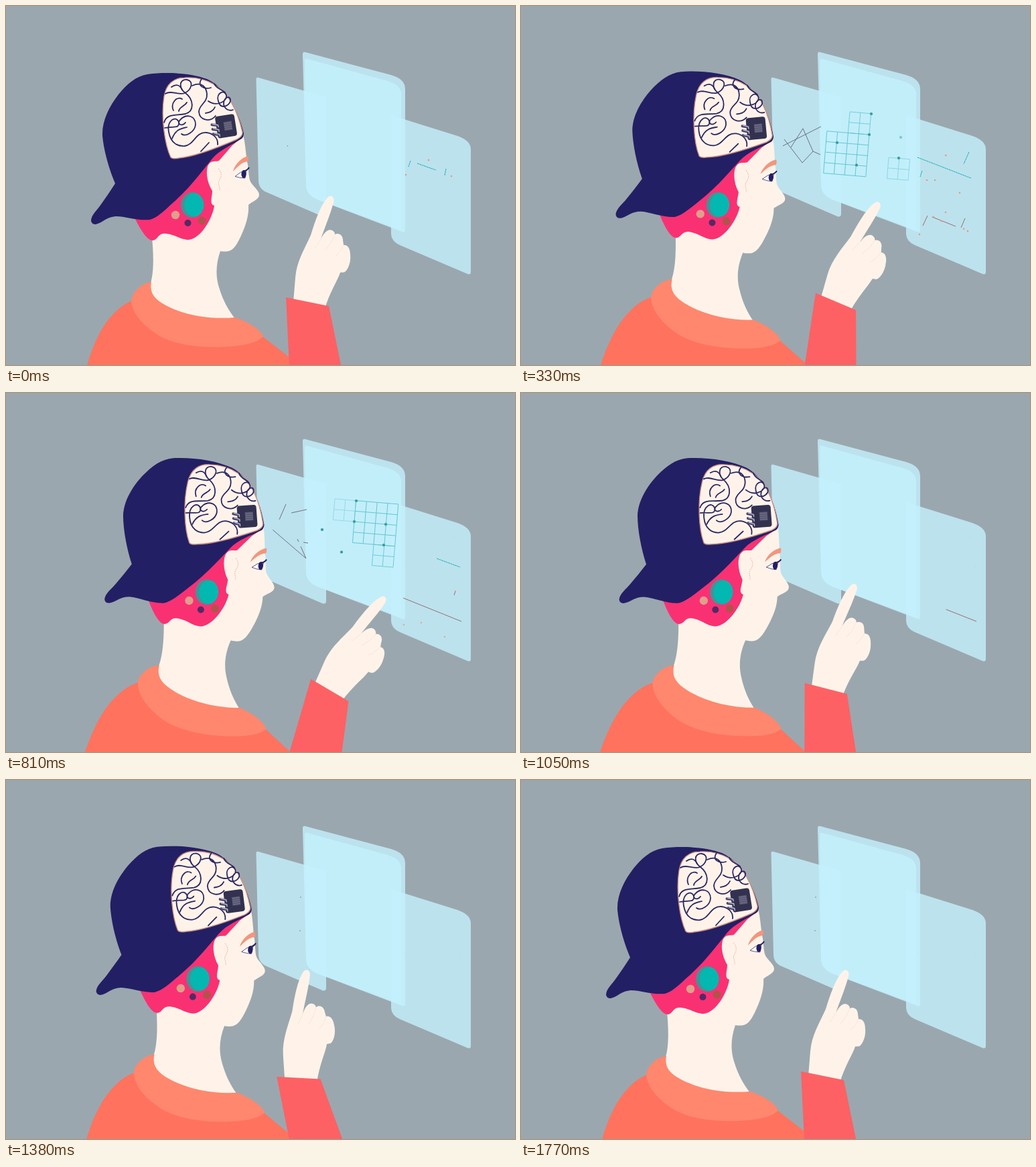
These frames come from a looping animation (760x536 px, 1800 ms). An HTML page without scripts:

```html
<!DOCTYPE html>
<html lang="en">
<head>
<meta charset="utf-8">
<title>Touch panels</title>
<style>
html, body { margin: 0; width: 100%; height: 100%; overflow: hidden; background: #9ba7ae; }
svg { display: block; width: 760px; height: 536px; }
.skin { fill: #fff3e9; }
.navy { fill: #231f64; }
.line { fill: none; stroke: #6a7280; stroke-width: 1; }
.teal { stroke: #18b0ad; stroke-dasharray: 3 .6; }
.rust { stroke: #94706f; }
.dots { fill: none; stroke: #ee9480; stroke-width: 2.6; stroke-linecap: round; }
.grid { fill: none; stroke: #62c8cf; stroke-width: 1; }
#g2, #g4 { vector-effect: non-scaling-stroke; }
.nodes circle { fill: #4b908f; stroke: #2ba9a5; stroke-width: .8; }
.curl { fill: none; stroke: #2a2662; stroke-width: 1.8; stroke-linecap: round; }
</style>
</head>
<body>
<svg viewBox="0 0 760 536">
<defs>
  <path id="g2" d="M0 0h2M0 1h2M0 2h2M0 0v2M1 0v2M2 0v2"/>
  <path id="g4" d="M0 0h4M0 1h4M0 2h4M0 3h4M0 4h4M0 0v4M1 0v4M2 0v4M3 0v4M4 0v4"/>
</defs>
<rect width="760" height="536" fill="#9ba7ae"/>

<!-- translucent panels -->
<g fill="#c5f2fe" fill-opacity=".8">
  <path d="M373.500 109Q373.500 106 377 107L478 136V311Q477.500 316 472 314L389 278Q377 273 377 260Z"/>
  <path d="M575 163L674 194Q694 201 694 214V397Q694 402 689 400L588 357Q575 351 575 340Z"/>
  <path d="M443 72Q443 68 447 69L575 103Q596 109 596 124V334Q596 339 591 337L465 289Q449 282 448 268Z"/>
  <path d="M446 82Q446 78 450 79L570 112Q590 118 590 132V335L465 289Q449 282 448 268Z"/>
</g>

<!-- left panel: web of lines -->
<g class="line">
  <path><animate attributeName="d" dur="1.8s" repeatCount="indefinite" keyTimes="0;.183;.317;.45;.53;1" values="M420 209L421 209;M391 209L448 180;M385 193L449 175;M426 179L449 174;M449 174L449 174;M449 174L449 174"/></path>
  <path><animate attributeName="d" dur="1.8s" repeatCount="indefinite" keyTimes="0;.183;.317;.45;.53;1" values="M420 209L420 209;M393 199L420 234;M385 193L431 245;M398 204L448 247;M448 247L448 247;M448 247L448 247"/></path>
  <path><animate attributeName="d" dur="1.8s" repeatCount="indefinite" keyTimes="0;.183;.317;.45;.53;1" values="M420 209L420 209;M421 183L403 211;M418 173L399 212;M418 166L408 189;M418 166L418 166;M418 166L418 166"/></path>
  <path><animate attributeName="d" dur="1.8s" repeatCount="indefinite" keyTimes="0;.183;.317;.45;.53;1" values="M420 209L420 209;M421 183L436 217;M418 173L436 217;M435 218L437 222;M437 222L437 222;M437 222L437 222"/></path>
  <path><animate attributeName="d" dur="1.8s" repeatCount="indefinite" keyTimes="0;.183;.317;.45;.53;1" values="M420 209L420 209;M436 217L420 234;M436 217L430 245;M440 229L448 247;M448 247L448 247;M448 247L448 247"/></path>
  <path><animate attributeName="d" dur="1.8s" repeatCount="indefinite" keyTimes="0;.183;.317;.45;.53;1" values="M420 209L420 209;M436 217L447 222;M436 217L447 221;M444 223L451 224;M451 224L451 224;M451 224L451 224"/></path>
</g>
<g fill="#5c6b78" opacity="0">
  <circle cx="440" cy="175" r=".7"/><circle cx="439" cy="225" r=".7"/>
  <animate attributeName="opacity" dur="1.8s" repeatCount="indefinite" calcMode="discrete" keyTimes="0;.62;1" values="0;1;1"/>
</g>

<!-- centre panel: grid blocks -->
<g class="grid" transform="matrix(15.8 1.33 -1.3 15.7 491 158)">
  <use href="#g4" x="-2" y="2" opacity="0"><animate attributeName="opacity" dur="1.8s" repeatCount="indefinite" keyTimes="0;.05;.15;.34;.42;1" values="0;0;1;1;0;0"/></use>
  <use href="#g2" opacity="0"><animate attributeName="opacity" dur="1.8s" repeatCount="indefinite" keyTimes="0;.1;.2;.41;.49;1" values="0;0;1;1;0;0"/></use>
  <use href="#g2" x="4" y="4" opacity="0"><animate attributeName="opacity" dur="1.8s" repeatCount="indefinite" keyTimes="0;.13;.22;.44;.53;1" values="0;0;1;1;0;0"/></use>
  <use href="#g4" x="2" opacity="0"><animate attributeName="opacity" dur="1.8s" repeatCount="indefinite" keyTimes="0;.19;.28;.47;.57;1" values="0;0;1;1;0;0"/></use>
</g>
<g class="nodes" opacity="0">
  <circle cx="523" cy="161" r="1.8"/><circle cx="520" cy="192" r="1.8"/>
  <circle cx="472" cy="204" r="1.8"/><circle cx="501" cy="237.500" r="1.8"/>
  <circle cx="564" cy="227" r="1.8"/>
  <circle cx="567" cy="196" r="1.8"><animate attributeName="opacity" dur="1.8s" repeatCount="indefinite" keyTimes="0;.15;.25;1" values="0;.2;1;1"/></circle>
  <animate attributeName="opacity" dur="1.8s" repeatCount="indefinite" keyTimes="0;.07;.15;.48;.57;1" values="0;0;1;1;0;0"/>
</g>

<!-- right panel: plots -->
<g class="line">
  <path class="teal"><animate attributeName="d" dur="1.8s" repeatCount="indefinite" keyTimes="0;.183;.317;.45;.53;1" values="M614 235L642 245;M592 226L672 257;M592 226L678 260;M643 247L678 260;M678 260L678 260;M678 260L678 260"/></path>
  <path class="teal"><animate attributeName="d" dur="1.8s" repeatCount="indefinite" keyTimes="0;.183;.28;1" values="M604 231L601 240;M599 246L596 255;M594 258L594 258;M594 258L594 258"/></path>
  <path class="teal"><animate attributeName="d" dur="1.8s" repeatCount="indefinite" keyTimes="0;.183;.3;1" values="M657 243L655 253;M669 218L661 236;M669 215L669 215;M669 215L669 215"/></path>
  <path class="rust"><animate attributeName="d" dur="1.8s" repeatCount="indefinite" keyTimes="0;.1;.183;.317;.45;.7;.74;1" values="M630 321L630 321;M630 321L630 321;M614 315L649 329;M593 306L673 338;M593 306L680 341;M671 338L680 341;M680 341L680 341;M680 341L680 341"/></path>
  <path class="rust"><animate attributeName="d" dur="1.8s" repeatCount="indefinite" keyTimes="0;.1;.183;.317;.45;1" values="M609 306L609 306;M609 306L609 306;M607 313L600 328;M602 323L594 344;M594 346L594 346;M594 346L594 346"/></path>
  <path class="rust"><animate attributeName="d" dur="1.8s" repeatCount="indefinite" keyTimes="0;.1;.183;.317;.45;.5;1" values="M657 331L657 331;M657 331L657 331;M663 317L657 331;M671 301L662 322;M671 296L669 302;M671 294L671 294;M671 294L671 294"/></path>
</g>
<path class="dots">
  <animate attributeName="d" dur="1.8s" repeatCount="indefinite" keyTimes="0;.183;.317;1" values="M631 230h0M597 252h0M631 230h0M665 254h0;M634 223h0M606 260h0M618 260h0M655 279h0;M669 215h0M607 260h0M617 262h0M653 282h0;M669 215h0M607 260h0M617 262h0M653 282h0"/>
  <animate attributeName="opacity" dur="1.8s" repeatCount="indefinite" keyTimes="0;.33;.41;1" values="1;1;0;0"/>
</path>
<path class="dots" opacity="0">
  <animate attributeName="d" dur="1.8s" repeatCount="indefinite" keyTimes="0;.183;.317;.45;1" values="M634 316h0M616 308h0M628 312h0M661 325h0M667 326h0M595 334h0;M634 308h0M616 315h0M628 321h0M661 333h0M667 336h0M595 341h0;M635 304h0M616 340h0M637 346h0M671 302h0M658 359h0M592 349h0;M671 296h0M620 343h0M620 343h0M671 296h0M655 364h0M594 346h0;M671 296h0M620 343h0M620 343h0M671 296h0M655 364h0M594 346h0"/>
  <animate attributeName="opacity" dur="1.8s" repeatCount="indefinite" keyTimes="0;.09;.15;.43;.51;1" values="0;0;1;1;0;0"/>
</path>

<!-- figure -->
<g>
  <animateTransform attributeName="transform" type="rotate" dur="1.8s" repeatCount="indefinite" calcMode="spline" keyTimes="0;.283;.542;.933;1" keySplines=".35 0 .65 1;0 0 1 1;.35 0 .65 1;0 0 1 1" values="0 287 550;4.9 287 550;4.9 287 550;0 287 550;0 287 550"/>
  <path class="skin" d="M354 192C358 208 358 224 361 237C363 250 362 258 366 264C370 270 378 276 378 282C378 289 367 292 362 297C363 312 358 326 354 336C348 350 342 364 332 366Q326 367 320 366C313 386 313 404 318 420C324 440 332 454 342 467L300 480L230 460L212 425C221 405 221 380 218 345L230 230Z"/>
  <path fill="#f93173" d="M193 318C200 332 210 350 219 350C228 349 226 338 240 340C254 342 261 349 273 349C292 347 309 315 311 298C303 296 308 285 308 276C301 265 298 250 301 240C305 229 313 233 318 231L338 208L354 195L290 200Z"/>
  <path fill="none" stroke="#f2a595" stroke-dasharray="1.5 1.5" d="M317 243C323 249 322 255 318 261C316 267 320 269 319 275"/>
  <!-- ear studs -->
  <ellipse cx="278" cy="297" rx="17" ry="19" fill="#4b8f95"/>
  <ellipse cx="281" cy="297" rx="14.500" ry="17.500" fill="#02b8b0"/>
  <circle cx="253" cy="312" r="6.200" fill="#dfa08c"/>
  <circle cx="271.500" cy="324" r="5" fill="#532a66"/>
  <circle cx="292.500" cy="320.500" r="6" fill="#b3524c"/>
  <!-- eye -->
  <path fill="#f4957e" d="M339 247C341 238 350 227 361 224Q363 228 361 232C352 233 346 240 339 247Z"/>
  <path fill="#fff" stroke="#37305f" stroke-width=".8" d="M342 254.500Q350 247 359 245L357 257Q350 257 342 254.500Z"/>
  <ellipse cx="355" cy="251" rx="3.600" ry="6" class="navy"/>
  <path fill="none" stroke="#231f64" stroke-width="2" d="M354 247Q360 246 363 241"/>
  <!-- cap -->
  <path class="navy" d="M127 321C127 312 136 305 142 296C149 286 156 276 163 265C154 244 146 216 144 194C143 172 154 150 168 132C181 116 194 105 211 102C240 98 276 100 300 109C324 119 347 154 355 190Q355 195 352 198C338 207 318 215 307 229C288 253 270 276 249 294C237 305 226 316 215 319C196 321 179 314 164 314C150 315 146 322 137 325Q129 328 127 321Z"/>
  <path class="skin" stroke="#c98f86" stroke-width="1.4" d="M246 226C237 207 231 166 236 135C239 117 250 107 267 107C300 105 325 122 337 145C345 159 350 175 353 188Q354 194 345 199C315 212 280 225 258 227Q249 229 246 226Z"/>
  <g class="curl">
    <path d="M238 131C246 125 258 134 267 130C277 125 281 112 270 110C258 109 258 123 268 130C280 139 282 157 268 161C254 164 240 160 236 174"/>
    <path d="M247 121C255 115 260 119 263 125M250 156C245 145 255 134 263 139M258 157C259 150 267 150 270 144"/>
    <path d="M278 119C293 112 299 122 300 131C301 145 288 147 288 158C289 171 305 174 313 164M292 109C285 119 295 125 306 122M298 160C303 159 309 158 312 151"/>
    <path d="M302 142C315 151 331 142 329 133C326 124 313 130 317 142C320 155 333 150 335 142C336 132 324 136 325 147C327 155 334 157 339 155M311 116C314 124 322 124 327 129"/>
    <path d="M237 182C249 179 260 184 258 173C253 163 240 171 243 188C246 206 258 210 267 209C281 207 283 188 299 189C310 190 317 198 316 207"/>
    <path d="M262 191C268 196 282 188 283 177C283 163 269 161 261 169C253 176 263 181 268 174M248 198C253 184 262 183 270 181M291 217L303 204"/>
  </g>
  <!-- chip -->
  <g transform="rotate(-9 328 179)">
    <rect x="314" y="163" width="29" height="33" rx="4" fill="#323150"/>
    <rect x="325.500" y="173" width="12" height="13" fill="#565570"/>
    <path stroke="#858398" stroke-width=".7" d="M326 175h11m-11 3h11m-11 3h11m-11 3h11"/>
    <path fill="none" stroke="#48466c" stroke-width="4" stroke-linecap="round" d="M308 174l7 2m-7 5l7 2m-7 5l7 2"/>
    <path fill="none" stroke="#c5c3d4" stroke-width="1.3" stroke-linecap="round" d="M309 173l8 3v3m-8 1l8 3v3m-8 1l8 3v3"/>
  </g>
  <!-- sweater -->
  <path fill="#ff735e" d="M189 440C168 447 150 469 139 490C127 513 120 537 113 570H480L425 526L384 494L300 490Z"/>
  <path fill="#ff876d" d="M217 412C204 413 189 426 187 439C188 460 207 480 234 495C260 507 290 510 322 509C348 508 375 504 384 493C380 482 360 471 342 465C310 468 274 463 247 451C228 442 213 433 217 412Z"/>
</g>

<!-- arm -->
<g>
  <animateTransform attributeName="transform" type="rotate" dur="1.8s" repeatCount="indefinite" keyTimes="0;.061;.122;.183;.244;.317;.361;.4;.45;.5;.556;.611;.656;.7;.75;.8;.85;.917;.983;1" values="0 465 532;3.3 465 532;7.5 465 532;11.3 465 532;15.6 465 532;19.4 465 532;20 465 532;20 465 532;19.1 465 532;15.2 465 532;7 465 532;-1 465 532;-5 465 532;-6.9 465 532;-8.3 465 532;-8.6 465 532;-7.8 465 532;-4.2 465 532;0 465 532;0 465 532"/>
  <path class="skin" d="M429 442L432 405C434 381 446 362 455 342C462 319 470 297 480 286C485 281 491 285 489 293C484 312 476 330 470 348C474 340 480 332 487 335Q491 337 491 341C496 338 503 341 503 350L504 357C510 356 514 362 514 372C515 382 511 392 507 396C504 399 501 397 499 398C495 410 483 428 476 452Z"/>
  <path fill="none" stroke="#f6e4d8" stroke-width=".9" d="M491 341Q487 353 477 364M504 356Q499 368 491 374M470 348L461 362"/>
  <path fill="#fe6164" d="M418 435L482 448L505 560L424 560Z">
    <animateTransform attributeName="transform" type="translate" dur="1.8s" repeatCount="indefinite" keyTimes="0;.317;.45;.611;1" values="0 0;3.5 1;3.5 1;0 0;0 0"/>
  </path>
</g>
</svg>
</body>
</html>
```
